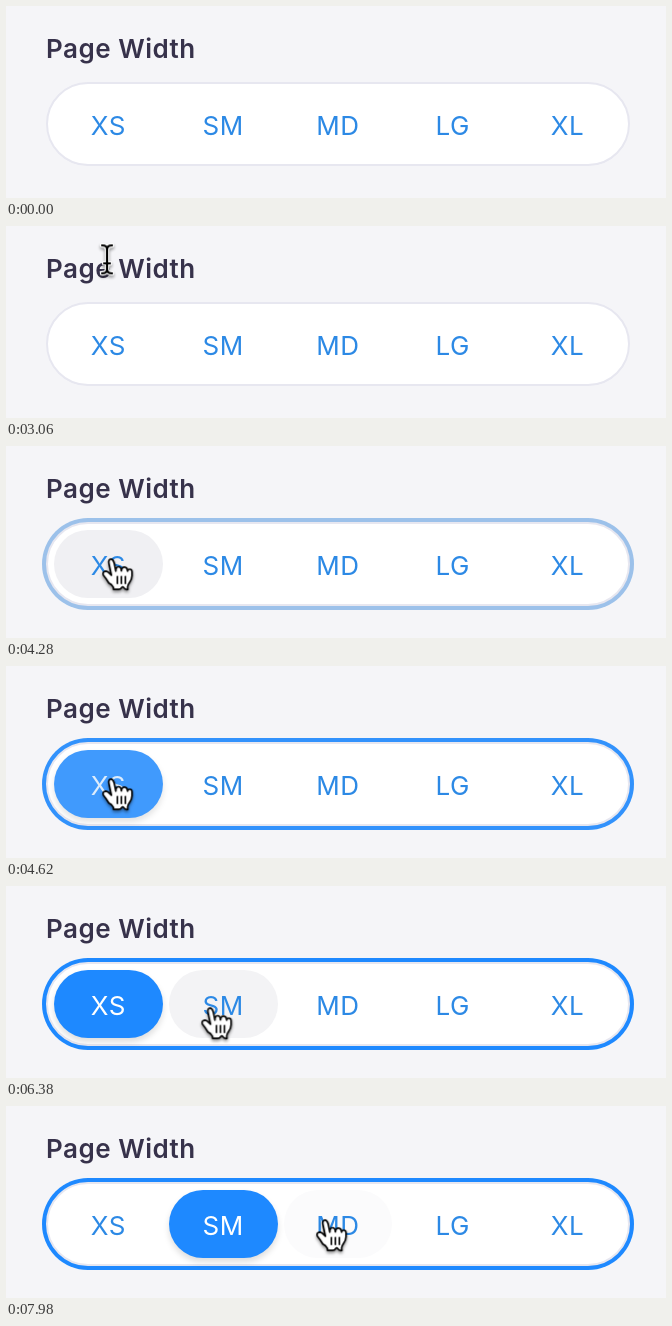
An HTML page that plays this animation: 660 by 192 pixels, repeating every 8 s.

```html
<!DOCTYPE html>
<html lang="en">
<head>
<meta charset="utf-8">
<title>Page Width</title>
<style>
  :root { --blue: #1e89ff; --link: #2c89e5; --hover: #f0f0f3; }
  html, body { margin: 0; width: 100%; height: 100%; overflow: hidden; background: #f5f5f8; }
  body { position: relative; font-family: Inter, sans-serif; font-size: 26px; letter-spacing: .5px; cursor: default; }

  h1 {
    position: absolute; left: 40px; top: 27px; margin: 0;
    font-size: 26px; font-weight: 600; line-height: 32px; color: #37324b; white-space: nowrap;
  }
  .group {
    position: absolute; left: 40px; top: 76px; width: 584px; height: 84px;
    box-sizing: border-box; padding: 6px; display: flex; gap: 6px;
    background: #fff; border: 2px solid #e7e7f0; border-radius: 42px;
    animation: ring 8s infinite;
  }
  .group span {
    flex: 1 1 0; box-sizing: border-box; padding-top: 2px; border-radius: 34px;
    display: flex; align-items: center; justify-content: center; color: var(--link);
  }
  .xs { animation: xs 8s infinite; }
  .sm { animation: sm 8s infinite; }
  .md { animation: md 8s infinite; }

  @keyframes ring {
    0%, 40% { box-shadow: 0 0 0 4px #9cc1ea00; }
    46.25%, 54.25% { box-shadow: 0 0 0 4px #9cc1ea; }
    60.75%, 100% { box-shadow: 0 0 0 4px var(--blue); }
  }
  @keyframes xs {
    0%, 40.25% { background: #fff; color: var(--link); box-shadow: 0 4px 6px #0000; }
    46.5%, 54.25% { background: var(--hover); color: var(--link); box-shadow: 0 4px 6px #0000; }
    60.75%, 84.5% { background: var(--blue); color: #fff; box-shadow: 0 4px 6px #0002; }
    91%, 100% { background: #fff; color: var(--link); box-shadow: 0 4px 6px #0000; }
  }
  @keyframes sm {
    0%, 76.5% { background: #fff; color: var(--link); box-shadow: 0 4px 6px #0000; }
    82.75%, 84.5% { background: var(--hover); color: var(--link); box-shadow: 0 4px 6px #0000; }
    91%, 100% { background: var(--blue); color: #fff; box-shadow: 0 4px 6px #0002; }
  }
  @keyframes md {
    0%, 98.375% { background: #fff; animation-timing-function: linear; }
    100% { background: #fafafb; }
  }

  /* The pointer's hot spot sits at its own origin. */
  .pointer {
    position: absolute; left: 0; top: 0; width: 1px; height: 1px; overflow: visible;
    filter: drop-shadow(0 2px 1.5px #0006);
    animation: move 8s linear infinite;
  }
  .beam { animation: beam 8s step-end infinite; }
  .hand { animation: hand 8s step-end infinite; }

  @keyframes move {
    0%, 36.75% { transform: translate(97px, -24px); }
    38.25% { transform: translate(101px, 33px); }
    40.25% { transform: translate(103px, 84px); animation-timing-function: ease-out; }
    42.75%, 72.75% { transform: translate(105px, 113px); animation-timing-function: ease-in; }
    76.5% { transform: translate(161px, 120px); }
    79.75% { transform: translate(204px, 122px); animation-timing-function: ease-out; }
    82.75%, 97.25% { transform: translate(220px, 122px); }
    98.375% { transform: translate(276px, 118px); }
    99.75%, 100% { transform: translate(319px, 114px); }
  }
  @keyframes beam { 0% { opacity: 1; } 40%, 100% { opacity: 0; } }
  @keyframes hand { 0% { opacity: 0; } 40%, 100% { opacity: 1; } }
</style>
</head>
<body>
  <h1>Page Width</h1>
  <div class="group">
    <span class="xs">XS</span>
    <span class="sm">SM</span>
    <span class="md">MD</span>
    <span>LG</span>
    <span>XL</span>
  </div>
  <svg class="pointer" fill="none" stroke-linecap="round" stroke-linejoin="round">
    <defs>
      <path id="bar" d="M-5 -14Q0 -14 0 -10Q0 -14 5 -14M0 -10V10M-5 14Q0 14 0 10Q0 14 5 14M-3 4H3"/>
    </defs>
    <g class="beam">
      <use href="#bar" stroke="#fff" stroke-width="4.5"/>
      <use href="#bar" stroke="#000" stroke-width="2.2"/>
    </g>
    <g class="hand" transform="scale(2) translate(-12.4 -8.4)" stroke="#000">
      <path fill="#fff" stroke-width=".85" d="M11.3 20.4C10.6 19.2 9.7 17.8 8.6 16.5C8 15.4 8.8 14.4 9.9 14.4
        C11 14.5 11.8 15.7 12.6 16.5L11.4 10.8C11 9.3 11.5 8.4 12.4 8.4C13.3 8.4 13.7 9.4 14 10.4L14.8 14.4
        C14.6 11.6 17.4 11.5 17.6 14.3C17.7 11.7 20.5 11.9 20.7 14.5C20.9 13.1 22.8 13.2 22.9 14.6
        V16.8C22.9 19.8 20.8 20.3 20.7 22.4L20.8 23.6C19.5 23.9 19.2 23.4 18.6 22.5Q18.2 22 17.9 22.5
        C17 23.8 16.8 23.6 15.8 23.6H13.7C13.8 22 13.2 21.9 12.4 21.1Z"/>
      <path stroke-width=".8" d="M15.6 17.2V20.6M17.6 17.2V20.6M19.6 17.2V20.6"/>
    </g>
  </svg>
</body>
</html>
```
